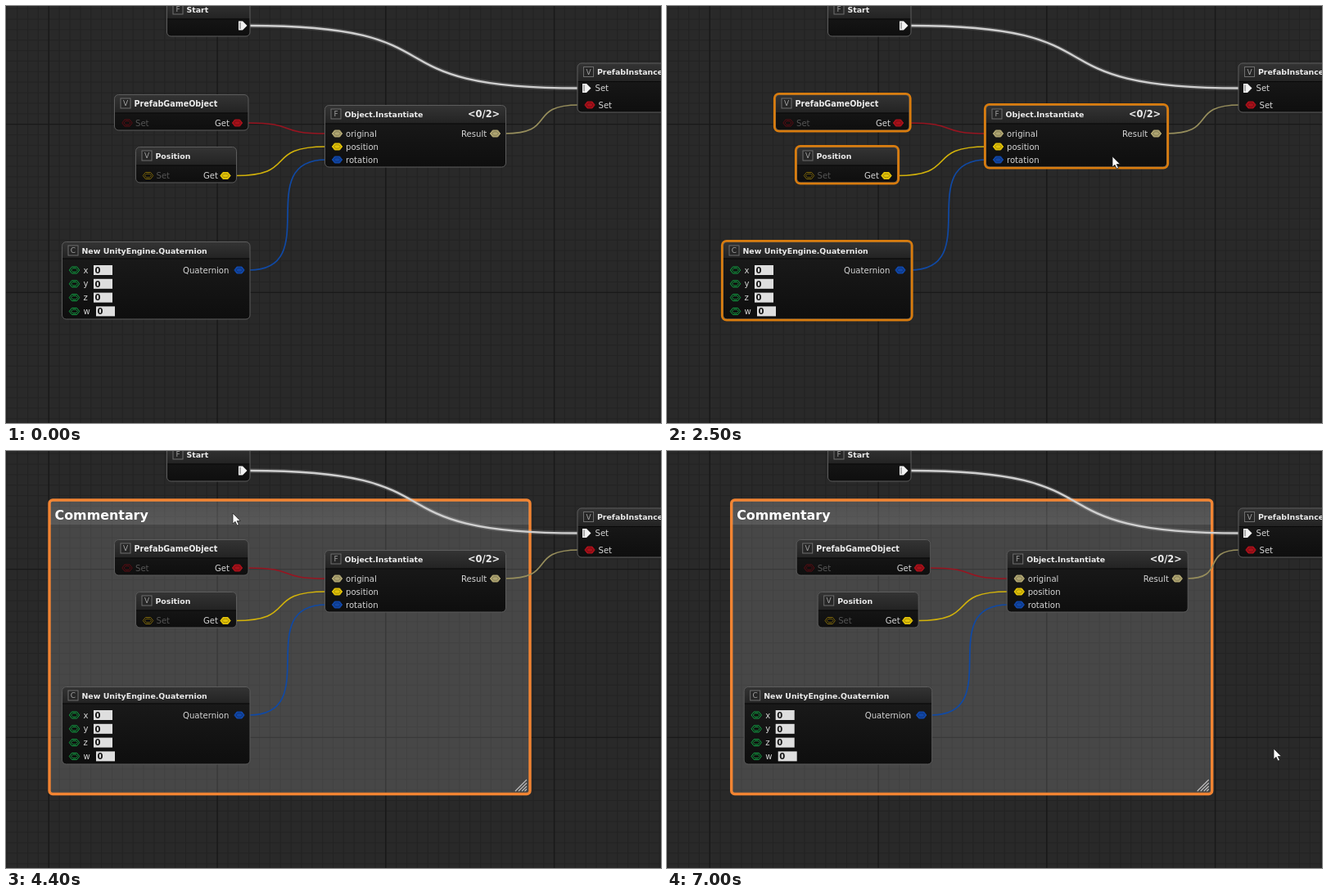
Write an HTML page that moves like this. It is 800 px wide and 510 px high and loops after 7.1 s.

```html
<!DOCTYPE html>
<html lang="en">
<head>
<meta charset="utf-8">
<title>Node graph commentary</title>
<style>
html, body { margin: 0; width: 100%; height: 100%; overflow: hidden; background: #292929; }
svg { display: block; width: 800px; height: 510px; }
text { font-family: "DejaVu Sans", sans-serif; font-size: 10.1px; fill: #d6d6d6; }
.b { font-weight: bold; font-size: 9.4px; fill: #ececec; }
</style>
</head>
<body>
<svg id="stage" viewBox="0 0 800 510" xmlns="http://www.w3.org/2000/svg">
  <defs>
    <linearGradient id="head" x2="0" y2="1">
      <stop offset="0" stop-color="#343434"/><stop offset="1" stop-color="#232323"/>
    </linearGradient>
    <linearGradient id="body" x2="0" y2="1">
      <stop offset="0" stop-color="#1c1c1c"/><stop offset="1" stop-color="#0e0e0e"/>
    </linearGradient>
    <linearGradient id="band" x2="0" y2="1">
      <stop offset="0" stop-color="#fff" stop-opacity=".05"/><stop offset="1" stop-color="#fff" stop-opacity=".1"/>
    </linearGradient>
    <filter id="soft" x="-10%" y="-10%" width="120%" height="120%"><feGaussianBlur stdDeviation="4"/></filter>
  </defs>
</svg>
<script>
const LOOP = 7100, CELL = 12.86;
const stage = document.getElementById("stage");

function el(parent, tag, attrs = {}, text) {
  const e = document.createElementNS("http://www.w3.org/2000/svg", tag);
  set(e, attrs);
  if (text !== undefined) e.textContent = text;
  parent.append(e);
  return e;
}
function set(e, attrs) {
  for (const k in attrs) e.setAttribute(k, attrs[k]);
}
function show(e, on) {
  e.setAttribute("visibility", on ? "visible" : "hidden");
}

// Background grid
function grid(step, x0, y0, colour, width) {
  let d = "";
  for (let x = x0; x < 800; x += step) d += `M${x.toFixed(1)},0V510`;
  for (let y = y0; y < 510; y += step) d += `M0,${y.toFixed(1)}H800`;
  el(stage, "path", { d, stroke: colour, "stroke-width": width, fill: "none" });
}
el(stage, "rect", { width: 800, height: 510, fill: "#292929" });
grid(CELL, 52.3 - 4 * CELL, 144.6 - 11 * CELL, "#232323", 1);
grid(CELL * 16, 52.3, 144.6, "#191919", 1.4);

// Commentary box
const note = el(stage, "g");
const noteShadow = el(note, "rect", { x: 50, y: 57, rx: 6, fill: "none", stroke: "#000", "stroke-width": 6, opacity: .12, filter: "url(#soft)" });
const noteBox = el(note, "rect", { x: 53, y: 60, rx: 4, fill: "#fff", "fill-opacity": .14 });
const noteBand = el(note, "rect", { x: 54, y: 61, height: 29, fill: "url(#band)" });
el(note, "text", { x: 59.5, y: 84, class: "b", style: "font-size:15.9px;fill:#fff" }, "Commentary");
const grip = el(note, "path", { d: "M-14,0L0,-14M-10,0L0,-10M-6,0L0,-6M-2.5,0L0,-2.5", stroke: "#bdbdbd", "stroke-width": 1.2 });

// Wires
function curve(x1, y1, x2, y2) {
  const c = (x2 - x1) * .62 + Math.abs(y2 - y1) * .25;
  return `M${x1},${y1}C${x1 + c},${y1} ${x2 - c},${y2} ${x2},${y2}`;
}
function wire(parent, d, colour, width = 1.7) {
  return el(parent, "path", { d, stroke: colour, "stroke-width": width, fill: "none" });
}
const flow = curve(297, 24, 701, 100.5);
wire(stage, flow, "rgba(255,255,255,.14)", 5.5);
wire(stage, flow, "#d0d0d0", 2.4);
const resultWire = wire(stage, "", "#978e5c");
const movingWires = el(stage, "g");
wire(movingWires, curve(295, 143, 391, 156), "#981420");
wire(movingWires, curve(280, 207.5, 391, 172), "#d2b20a");
wire(movingWires, curve(297, 323, 391, 188), "#1049a4");

// Nodes
const moving = el(stage, "g");
const rings = [];

function node(parent, x, y, w, h, letter, title, headH = 22) {
  const g = el(parent, "g");
  el(g, "rect", { x, y, width: w, height: h, rx: 5, fill: "url(#body)" });
  el(g, "path", { d: `M${x},${y + headH}v${5 - headH}q0,-5 5,-5h${w - 10}q5,0 5,5v${headH - 5}z`, fill: "url(#head)" });
  el(g, "path", { d: `M${x},${y + headH + .5}h${w}`, stroke: "#080808" });
  el(g, "rect", { x, y, width: w, height: h, rx: 5, fill: "none", stroke: "#5c5c5c" });
  const cx = x + 13.5, cy = y + 10.5;
  el(g, "rect", { x: cx - 6, y: cy - 6, width: 12, height: 12, fill: "#262626", stroke: "#6e6e6e" });
  el(g, "text", { x: cx, y: cy + 3.2, "text-anchor": "middle", style: "font-size:9px;fill:#a2a2a2" }, letter);
  const size = title === "PrefabGameObject" ? 9.6 : 9.4;
  el(g, "text", { x: x + 24, y: y + 14, class: "b", style: `font-size:${size}px` }, title);
  if (parent === moving) {
    rings.push(el(g, "rect", { x: x - 1.2, y: y - 1.2, width: w + 2.4, height: h + 2.4, rx: 5.5, fill: "none", stroke: "#d97c0e", "stroke-width": 2.8 }));
  }
  return g;
}
function label(g, x, y, text, colour = "#d6d6d6") {
  el(g, "text", { x, y: y + 3.6, style: `fill:${colour}` }, text);
}
function hex(rx, ry) {
  return `M${-rx},0L${-rx / 2},${-ry}H${rx / 2}L${rx},0L${rx / 2},${ry}H${-rx / 2}Z`;
}
function pin(g, x, y, colour, filled = true) {
  const p = el(g, "g", { transform: `translate(${x},${y})` });
  el(p, "path", { d: hex(6.2, 4), fill: filled ? colour : "#101010", stroke: colour, "stroke-width": 1 });
  el(p, "path", { d: hex(4, 2.2), fill: filled ? colour : "none", stroke: filled ? "rgba(0,0,0,.3)" : colour, "stroke-width": .9 });
}
function arrow(g, x, y) {
  el(g, "path", { d: `M${x - 5},${y - 5.5}h5l5.5,5.5l-5.5,5.5h-5z`, fill: "#f2f2f2" });
  el(g, "path", { d: `M${x - 3},${y - 4}v8`, stroke: "#555", "stroke-width": .9 });
}

const RED = "#a8111a", YELLOW = "#e2c208", BLUE = "#1147a8", KHAKI = "#b0a672", GREEN = "#12a545";

arrow(node(stage, 196.5, -6.5, 101.5, 43.5, "F", "Start"), 289, 24);

const target = node(stage, 698, 70, 130, 60, "V", "PrefabInstance");
arrow(target, 709, 100.5);
label(target, 719.5, 100.5, "Set");
pin(target, 713, 121, RED);
label(target, 723.5, 121, "Set");

const prefab = node(moving, 132.5, 108.5, 163.5, 43.5, "V", "PrefabGameObject");
pin(prefab, 148, 143, "#5c0c12", false);
label(prefab, 158, 143, "Set", "#555");
label(prefab, 255, 143, "Get");
pin(prefab, 282.5, 143, RED);

const position = node(moving, 158.5, 172.5, 123, 43.5, "V", "Position");
pin(position, 173.5, 207.5, "#7c650a", false);
label(position, 183.5, 207.5, "Set", "#555");
label(position, 241, 207.5, "Get");
pin(position, 268, 207.5, YELLOW);

const create = node(moving, 389.5, 121.5, 221, 75.5, "F", "Object.Instantiate");
el(create, "text", { x: 564, y: 136, class: "b", style: "font-size:11.4px" }, "<0/2>");
[["original", KHAKI], ["position", YELLOW], ["rotation", BLUE]].forEach(([name, colour], i) => {
  pin(create, 404.5, 156 + 16 * i, colour);
  label(create, 415, 156 + 16 * i, name);
});
label(create, 556, 156, "Result");
pin(create, 597.5, 156, KHAKI);

const quat = node(moving, 68.5, 288.5, 229.5, 94.5, "C", "New UnityEngine.Quaternion", 20);
[..."xyzw"].forEach((name, i) => {
  const y = 323 + 16.8 * i, x = name === "w" ? 110 : 107;
  pin(quat, 83.5, y, GREEN, false);
  label(quat, 94.5, y, name);
  el(quat, "rect", { x, y: y - 6, width: 23, height: 12, fill: "#dedede" });
  el(quat, "text", { x: x + 1.5, y: y + 3.7, style: "font-weight:bold;fill:#161616" }, "0");
});
label(quat, 216, 323, "Quaternion");
pin(quat, 285, 323, BLUE);

// Selection marquee and pointer
const marquee = el(stage, "rect", { fill: "rgba(52,84,118,.36)", stroke: "rgba(70,105,140,.45)" });
const pointer = el(stage, "path", { d: "M0,0V13L3,10.3L5.2,15L7.4,14L5.2,9.5H9.3Z", fill: "#fff", stroke: "#222", "stroke-width": .8 });

// Pointer stops: time, x, y
const PATH = [
  [100, 130, 495], [200, 82, 330], [300, 180, 90], [400, 420, 25], [500, 650, 60],
  [600, 775, 180], [700, 750, 320], [800, 666, 382], [900, 557, 345], [1000, 373, 245],
  [1100, 205, 150], [1200, 120, 90], [1300, 120, 88], [1500, 227, 112], [1600, 243, 137],
  [1900, 664, 368], [2100, 547, 276], [2200, 547, 276], [2400, 277, 157], [2500, 544, 184],
  [3000, 544, 184], [3500, 604, 282], [3700, 662, 350], [3900, 708, 345], [4400, 277, 76],
  [4700, 277, 76], [5100, 291, 76], [5500, 304, 76], [6000, 741, 364], [7100, 741, 364]
];
function pointerAt(t) {
  const i = Math.max(1, PATH.findIndex(p => p[0] >= t));
  const [t0, x0, y0] = PATH[i - 1], [t1, x1, y1] = PATH[i];
  const k = (t - t0) / (t1 - t0);
  return [x0 + (x1 - x0) * k, y0 + (y1 - y0) * k];
}

function draw(t) {
  // dragging snaps to the grid
  const off = t < 5000 ? 0 : t < 5500 ? CELL : 2 * CELL;
  const shift = `translate(${off.toFixed(1)},0)`;
  [note, movingWires, moving].forEach(g => set(g, { transform: shift }));
  set(resultWire, { d: curve(609 + off, 156, 700, 121) });

  const chosen = t >= 4400;
  rings.forEach(r => show(r, t >= 1200 && !chosen));

  const grow = 1 - Math.min(1, Math.max(0, (3300 - t) / 300)) ** 2;
  const w = 446 + 141 * grow, h = 283 + 76.5 * grow;
  note.setAttribute("display", t >= 3000 ? "inline" : "none");
  set(noteBox, { width: w, height: h, stroke: chosen ? "#f28432" : "#8a5530", "stroke-width": chosen ? 3.4 : 2 });
  set(noteShadow, { width: w + 6, height: h + 6 });
  show(noteShadow, !chosen);
  set(noteBand, { width: w - 2 });
  set(grip, { transform: `translate(${49 + w},${56.5 + h})` });

  const dragging = t > 900 && t < 1200;
  show(pointer, t >= 100);
  show(marquee, dragging);
  if (t < 100) return;
  const [px, py] = pointerAt(t);
  set(pointer, { transform: `translate(${px.toFixed(1)},${py.toFixed(1)})` });
  if (dragging) {
    // the marquee trails the pointer slightly
    const [x, y] = pointerAt(t - 11.5);
    set(marquee, { x, y, width: 557 - x, height: 345 - y });
  }
}

const start = performance.now();
function tick() {
  const t = (performance.now() - start) % LOOP;
  draw(Math.floor(t / 100) * 100);
  requestAnimationFrame(tick);
}
tick();
</script>
</body>
</html>
```
